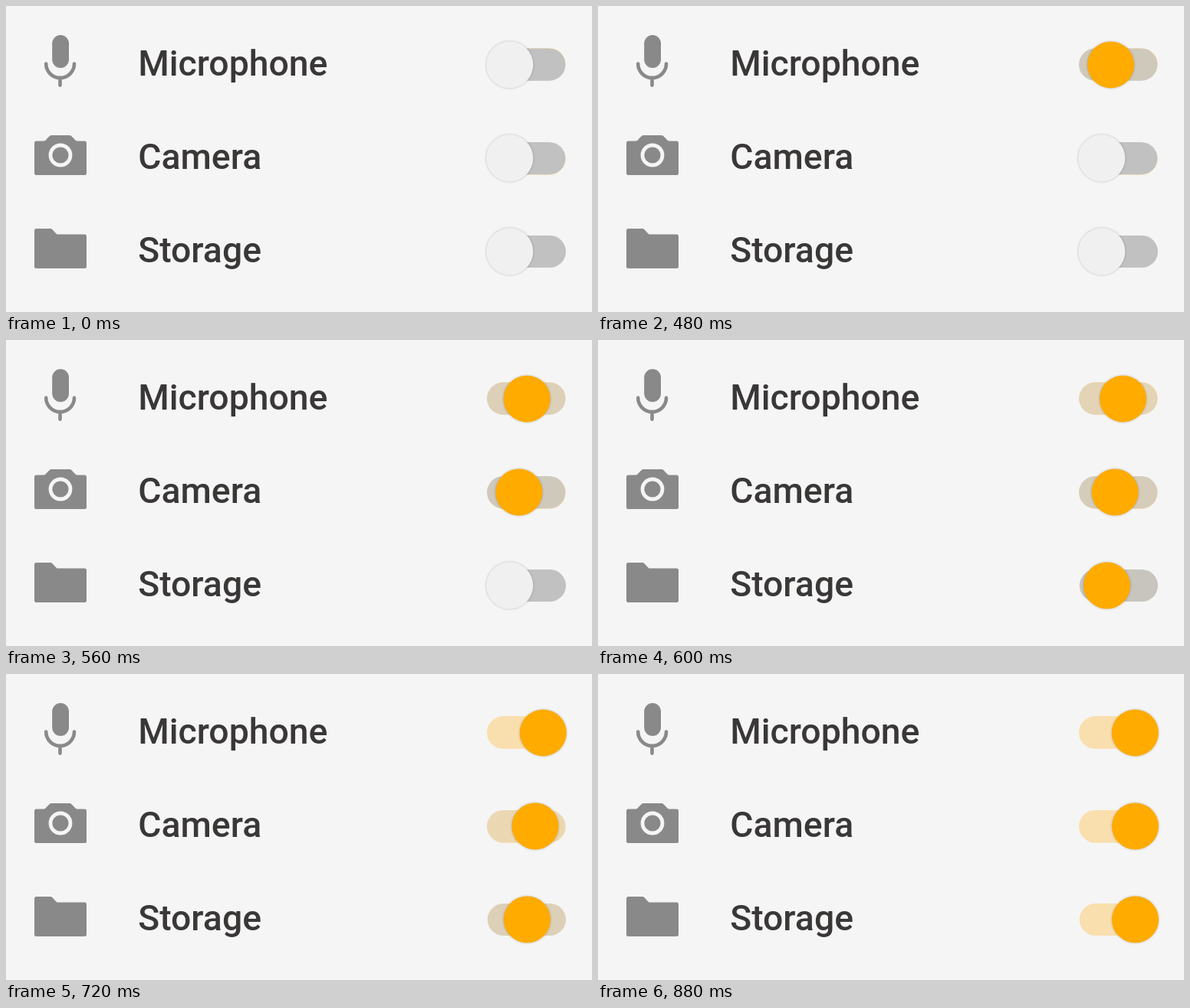
Animation of 764 by 400 pixels, one loop 1.16 s. Source, as an HTML page:

```html
<!DOCTYPE html>
<html lang="en">
<head>
<meta charset="utf-8">
<title>Permissions</title>
<style>
  @property --p { syntax: "<number>"; inherits: true; initial-value: 0; }

  html, body { margin: 0; width: 100%; height: 100%; overflow: hidden; background: #f5f5f5; }
  svg { display: block; width: 764px; height: 400px; }

  text { font: 500 46.3px Roboto, sans-serif; fill: #3a3737; }
  .icon { fill: #898989; }
  .line { fill: none; stroke: #898989; stroke-width: 4.6; stroke-linecap: round; }

  /* --p runs from 0 (off) to 1 (on); --on flips with the first step */
  .switch { --on: clamp(0, var(--p) * 100, 1); animation: 1160ms infinite; }
  .mic { animation-name: mic; }
  .cam { animation-name: cam; }
  .sto { animation-name: sto; }

  .edge { fill: #f9dfae; }
  .track { fill: color-mix(in srgb, #f9dfae calc(var(--p) * 100%), #c1c1c1); }
  .off, .on { filter: drop-shadow(0 .5px 1.5px rgba(0, 0, 0, .24)); }
  .off { fill: #f0f0f0; opacity: calc(1 - var(--on)); }
  .on {
    fill: #ffab00;
    opacity: var(--on);
    transform: translateX(calc(var(--p) * 42.3px));
  }

  /* eight 40 ms steps each, starting at 440, 520 and 600 ms */
  @keyframes mic {
    0% { --p: 0; }
    37.925% { --p: 0; animation-timing-function: steps(8, start); }
    65.51%, 100% { --p: 1; }
  }
  @keyframes cam {
    0% { --p: 0; }
    44.82% { --p: 0; animation-timing-function: steps(8, start); }
    72.405%, 100% { --p: 1; }
  }
  @keyframes sto {
    0% { --p: 0; }
    51.72% { --p: 0; animation-timing-function: steps(8, start); }
    79.305%, 100% { --p: 1; }
  }
</style>
</head>
<body>
<svg viewBox="0 0 764 400">
  <rect class="icon" x="60.2" y="38" width="21.8" height="43" rx="10.9"/>
  <path class="line" d="M52.2 75.5a18.4 18.4 0 0 0 36.8 0M70.5 95v8.6"/>
  <text x="172.2" y="91">Microphone</text>

  <path class="icon" d="M39.5 176.5H49q1.5 0 2.5-1l5-5.2q1.2-1.3 3-1.3h23q1.8 0 3 1.3l5 5.2q1 1 2.5 1h9.500q2.500 0 2.500 2.500v39.500q0 2.500-2.500 2.500h-63q-2.500 0-2.500-2.500V179q0-2.500 2.500-2.500z"/>
  <circle cx="71" cy="195" r="13" fill="none" stroke="#f5f5f5" stroke-width="4.8"/>
  <text x="172.2" y="213">Camera</text>

  <path class="icon" d="M39.5 291H58q1.2 0 2 .8l5.4 5.8q.9.9 2 .9h35.1q2.5 0 2.5 2.5v39.5q0 2.5-2.5 2.5h-63q-2.5 0-2.5-2.5v-47q0-2.5 2.5-2.5z"/>
  <text x="172.2" y="335">Storage</text>

  <g class="switch mic">
    <rect class="edge" x="627.5" y="55.1" width="102.2" height="42" rx="21"/>
    <rect class="track" x="627" y="55.5" width="102.3" height="42.2" rx="21.1"/>
    <circle class="off" cx="656.7" cy="76.8" r="30.6"/>
    <circle class="on" cx="658" cy="76.9" r="30.5"/>
  </g>
  <g class="switch cam">
    <rect class="edge" x="627.5" y="178.6" width="102.2" height="42.2" rx="21.1"/>
    <rect class="track" x="627" y="178" width="102.3" height="42.2" rx="21.1"/>
    <circle class="off" cx="656.7" cy="198.8" r="30.6"/>
    <circle class="on" cx="658.2" cy="199" r="30.5"/>
  </g>
  <g class="switch sto">
    <rect class="track" x="627.7" y="300" width="102.3" height="42" rx="21"/>
    <circle class="off" cx="656.7" cy="320.9" r="30.6"/>
    <circle class="on" cx="658.2" cy="321" r="30.5"/>
  </g>
</svg>
</body>
</html>
```
